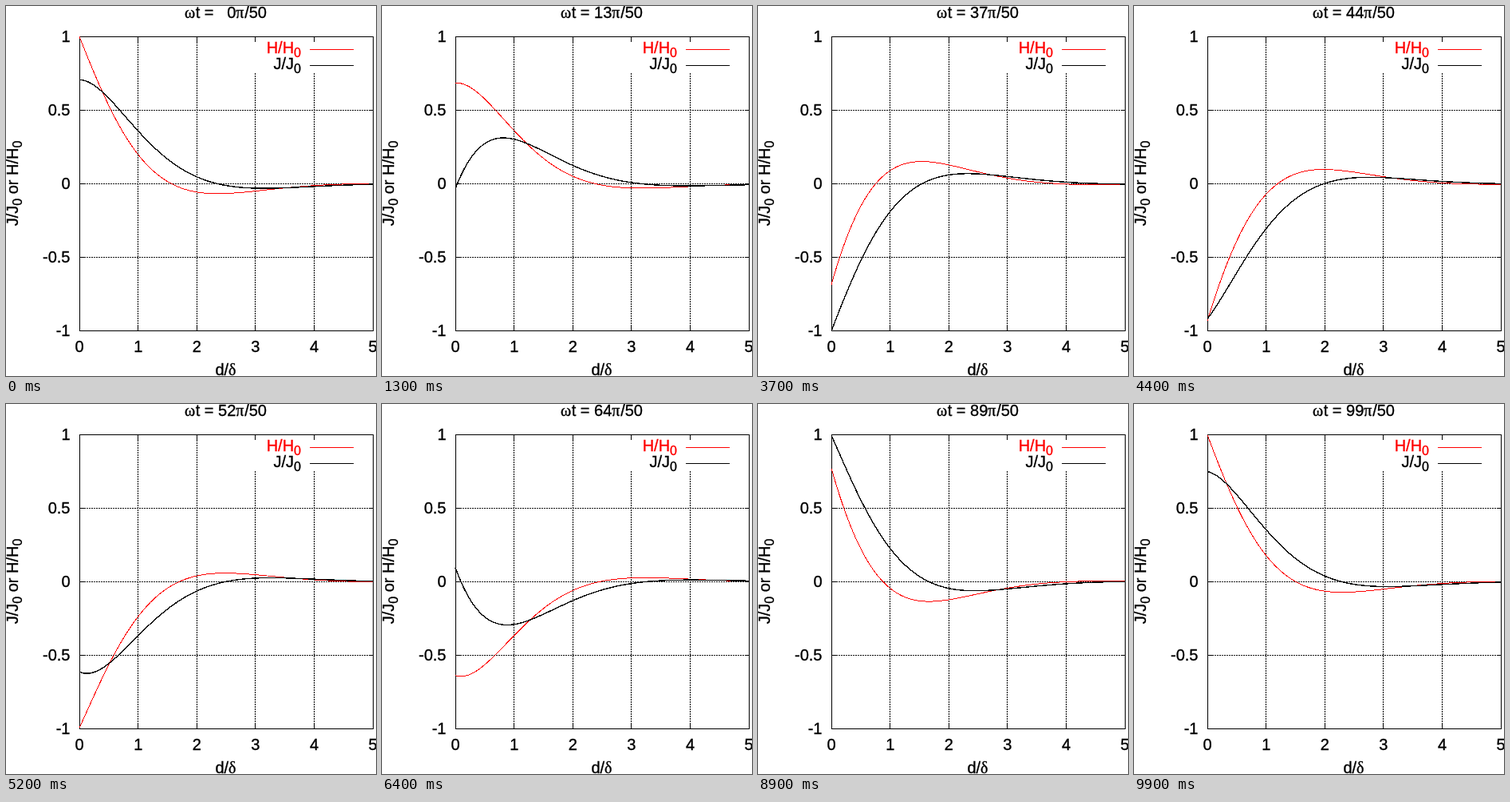
These frames come from a looping animation (464x463 px, 10000 ms). An HTML page:

```html
<!DOCTYPE html>
<html lang="en">
<head>
<meta charset="utf-8">
<title>Skin depth waves</title>
<style>
  html, body { margin: 0; width: 100%; height: 100%; overflow: hidden; background: #fff; }
  svg { display: block; width: 464px; height: 463px; color: #000; }
  text {
    font: 20px "Liberation Sans", Arial, sans-serif; white-space: pre;
    fill: currentColor; stroke: currentColor; stroke-width: 0.35px;
  }
  .greek { font-family: "Liberation Serif", Times, serif; }
  .sub { font-size: 16px; }
  path { fill: none; stroke: currentColor; shape-rendering: crispEdges; }
  .grid { stroke-dasharray: 2 1; }
  .thick { stroke-width: 1.4; }
  .red { color: #f00; }
</style>
</head>
<body>
<svg viewBox="0 0 464 463">
  <g id="axes"></g>
  <path id="h" class="red"/>
  <path id="j" class="thick"/>
  <path class="red" d="M381 54.5H436"/>
  <path class="thick" d="M381 74.5H436"/>
  <g id="labels"></g>
</svg>
<script>
const LEFT = 92.5, TOP = 38.5, RIGHT = 460.5, BOTTOM = 406.5;
const ORIGIN = 92.1, UNIT_X = 73.6, UNIT_Y = 184, ZERO = 222.5;
const LOOP = 10000, STEP = 100, TICK = 6;
const $ = id => document.getElementById(id);
const NS = "http://www.w3.org/2000/svg";

function add(parent, tag, attrs, content) {
  const el = document.createElementNS(NS, tag);
  for (const key in attrs) el.setAttribute(key, attrs[key]);
  if (content) el.innerHTML = content;
  $(parent).appendChild(el);
  return el;
}
const line = (d, cls = "") => add("axes", "path", { d, class: cls });
const label = (x, y, str, anchor = "start", extra = {}) =>
  add("labels", "text", { x, y, "text-anchor": anchor, ...extra }, str);

const sub = '<tspan class="sub" dy="5">0</tspan>';
const ratio = c => `${c}/${c}${sub}`;

for (let i = 0; i <= 5; i++) {
  const x = Math.floor(ORIGIN + UNIT_X * i) + 0.5;
  // The grid leaves room for the legend.
  const end = i === 3 || i === 4 ? 84 : TOP;
  if (i > 0 && i < 5) line(`M${x} ${BOTTOM}V${end}`, "grid");
  line(`M${x} ${TOP}v${TICK}M${x} ${BOTTOM}v${-TICK}`);
  label(ORIGIN + UNIT_X * i, 433, String(i), "middle");
}
for (let i = -2; i <= 2; i++) {
  const y = ZERO - i * UNIT_Y / 2;
  if (Math.abs(i) < 2) line(`M${LEFT - 0.5} ${y}H${RIGHT}`, "grid");
  line(`M${LEFT} ${y}h${TICK}M${RIGHT} ${y}h${-TICK}`);
  label(80.5, y + 6.5, String(i / 2), "end");
}
line(`M${LEFT} ${TOP}H${RIGHT}V${BOTTOM}H${LEFT}Z`);

label(370, 59, ratio("H"), "end", { class: "red" });
label(370, 79, ratio("J"), "end");
label(0, 0, `${ratio("J")}<tspan dy="-5"> or </tspan>${ratio("H")}`, "middle",
  { transform: "translate(15 222) rotate(-90)" });
label(262.5, 462, "d/");
label(279, 462, "δ", "start", { class: "greek" });

label(224, 15, "ω", "start", { class: "greek" });
label(237.7, 15, "t =");
const count = label(288.3, 15, "0", "end");
label(288.3, 15, "π", "start", { class: "greek" });
label(299.2, 15, "/50");

// Damped wave exp(-x) cos(phase - x)
function wave(phase) {
  const points = [];
  for (let i = 0; i < 100; i++) {
    const x = i * 5 / 99;
    const y = Math.exp(-x) * Math.cos(phase - x);
    points.push((ORIGIN + x * UNIT_X).toFixed(2) + " " + (ZERO - y * UNIT_Y).toFixed(2));
  }
  return "M" + points.join("L");
}

let shown = -1;
function draw(n) {
  if (n === shown) return;
  shown = n;
  const phase = n * Math.PI / 50;
  count.textContent = n;
  $("h").setAttribute("d", wave(phase));
  $("j").setAttribute("d", wave(phase + Math.PI / 4));
}

const begin = performance.now();
function tick() {
  draw(Math.floor((performance.now() - begin) % LOOP / STEP));
  requestAnimationFrame(tick);
}
tick();
</script>
</body>
</html>
```
